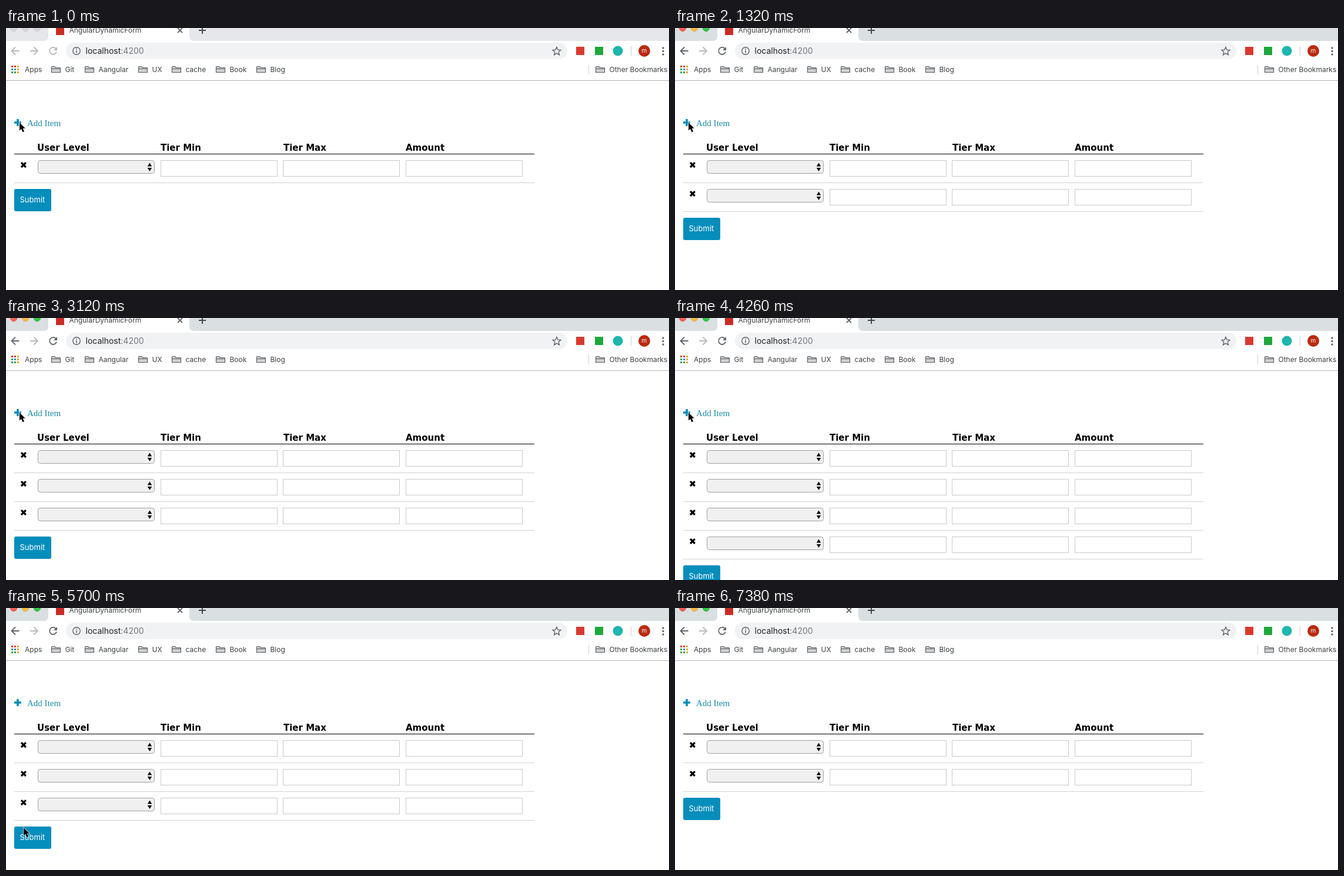
Write an HTML page that moves like this. It is 1128 by 446 pixels and loops after 7.44 s.

```html
<!DOCTYPE html>
<html lang="en">
<head>
<meta charset="utf-8">
<title>Dynamic form</title>
<style>
  html, body { margin: 0; width: 100%; height: 100%; overflow: hidden; background: #fff; }
  svg { display: block; }
  text { font: 12px Inter, sans-serif; fill: #3c4043; white-space: pre; }
  .url { font-size: 14px; fill: #202124; }
  .head { font: bold 15px "DejaVu Sans", sans-serif; fill: #000; }
  .link { font: 15px "Liberation Serif", serif; fill: #1b8aa8; }
  .submit { font-size: 13px; fill: #fff; }
  .line { fill: none; stroke: #5f6368; stroke-width: 1.8; }
  .idle #strip { fill: #e5e7eb; }
  .idle .light { fill: #d4d6d9; stroke: #c3c5c8; }
  .idle .nav { opacity: .45; }
</style>
</head>
<body>
<svg id="stage" width="1128" height="446" viewBox="0 0 1128 446">
  <rect id="strip" width="1128" height="22" fill="#dadfe1"/>
  <path d="M64 22Q72 22 72 14V-4H312V14Q312 22 320 22Z" fill="#fff"/>
  <circle class="light" cx="13" cy="0" r="5.5" fill="#fc615d" stroke="#df4744"/>
  <circle class="light" cx="33" cy="0" r="5.5" fill="#fdbc40" stroke="#de9f34"/>
  <circle class="light" cx="53" cy="0" r="5.5" fill="#34c84a" stroke="#27aa35"/>
  <rect x="85" y="-3" width="14" height="15" fill="#c92d25"/>
  <text x="107.5" y="8">AngularDynamicForm</text>
  <path class="line" d="M292 0l8 8m0-8l-8 8" stroke-width="1.6"/>
  <path class="line" d="M328 4h12M334 -2v12" style="stroke:#45494d;stroke-width:2"/>

  <path class="line nav" d="M22.500 39H10M16 32.500L9.500 39L16 45.500"/>
  <path class="line" d="M41 39H53.500M47.500 32.500L54 39L47.500 45.500" opacity=".45"/>
  <g class="nav">
    <path class="line" d="M84.700 35A6 6 0 1 0 86 40.500"/>
    <path d="M87 32v6h-6z" fill="#5f6368"/>
  </g>
  <rect x="102" y="25" width="853" height="28" rx="14" fill="#f0f2f4"/>
  <circle class="line" cx="120" cy="39" r="6.200" style="stroke-width:1.400"/>
  <path class="line" d="M120 35v1.700M120 38v4.500" style="stroke-width:1.500"/>
  <text class="url" x="135.500" y="44">localhost<tspan fill="#72767b">:4200</tspan></text>
  <path class="line" d="M937 32.500l2 4.600 4.900.4-3.700 3.300 1.100 4.900-4.300-2.600-4.300 2.600 1.100-4.900-3.700-3.300 4.900-.4z" style="stroke-width:1.400"/>
  <rect x="970" y="32" width="14" height="14" fill="#d93a30"/>
  <rect x="1002" y="32" width="14" height="14" fill="#1ea83c"/>
  <circle cx="1041" cy="39" r="8.500" fill="#20b5ad"/>
  <path d="M1063.500 31v16M991.500 63v16" stroke="#cfd1d4"/>
  <circle cx="1086" cy="39" r="10" fill="#b92b12"/>
  <text x="1086" y="42" text-anchor="middle" style="font-size:10px;fill:#fff">m</text>
  <path d="M1118 34h.01M1118 39.500h.01M1118 45h.01" stroke="#5f6368" stroke-width="3.400" stroke-linecap="round"/>
  <g id="bookmarks"></g>
  <path d="M0 89.500H1128" stroke="#b1b3b5"/>

  <path d="M14 161H26M20 155V167" stroke="#058cb5" stroke-width="3.600"/>
  <text class="link" x="36" y="167">Add Item</text>
  <g id="heads"></g>
  <path d="M14 214.500H899" stroke="#000"/>
  <g id="rows"></g>
  <g id="submit">
    <rect x="14" y="274" width="63" height="38" rx="3" fill="#058dbb"/>
    <text class="submit" x="23.500" y="297">Submit</text>
  </g>
  <path id="cursor" d="M0 0V13.500L3 10.700L5.400 16.200L8 15L5.600 9.700H9.700Z" fill="#000" stroke="#fff" stroke-width="1.200" paint-order="stroke"/>
</svg>
<script>
const LOOP = 7440, STEP = 60, ROW_HEIGHT = 49, MAX_ROWS = 4, FOCUS_AT = 240;
const $ = id => document.getElementById(id);

// [time, row count]
const rowCounts = [[0, 1], [1260, 2], [2760, 3], [4260, 4], [5340, 3], [6480, 2]];
// [time, x, y]
const cursorPath = [
  [0, 23, 161], [4320, 23, 161], [4800, 43, 361], [4900, 43, 361], [5160, 30, 374],
  [5760, 30, 374], [6240, 31, 333], [6600, 31, 333], [7140, 36, 465], [LOOP, 36, 465]
];

const folder = x => `<path d="M${x} 75.500V66.500Q${x} 65.500 ${x + 1} 65.500H${x + 5}L${x + 7} 67.500H${x + 14}Q${x + 15} 67.500 ${x + 15} 68.500V75.500Z
  M${x} 69.500H${x + 15}" fill="#d0d1d3" stroke="#55595d" stroke-width="1.100"/>`;

const dotColors = ["#e0392d", "#e0392d", "#e9a52b", "#2f9e50", "#3f7fe8", "#e9a52b", "#2f9e50", "#2f9e50", "#e9a52b"];
const appsGrid = dotColors.map((color, i) =>
  `<rect x="${9 + i % 3 * 5}" y="${64 + (i / 3 | 0) * 5}" width="3" height="3" fill="${color}"/>`).join("");

const bookmarks = [["Git", 78], ["Aangular", 135], ["UX", 226], ["cache", 283], ["Book", 358], ["Blog", 427], ["Other Bookmarks", 1004]];
$("bookmarks").innerHTML = appsGrid + `<text x="32" y="75">Apps</text>` +
  bookmarks.map(([name, x]) => folder(x - .5) + `<text x="${x + 22.5}" y="75">${name}</text>`).join("");

$("heads").innerHTML = [["User Level", 53], ["Tier Min", 263], ["Tier Max", 472], ["Amount", 680]]
  .map(([name, x]) => `<text class="head" x="${x}" y="209">${name}</text>`).join("");

const inputs = [263, 471, 680].map(x =>
  `<rect x="${x + .5}" y="225.500" width="198" height="27" fill="#fff" stroke="#c9c9c9"/>`).join("");
$("rows").innerHTML = Array.from({ length: MAX_ROWS }, (_, i) => `<g transform="translate(0 ${i * ROW_HEIGHT})">
  <path d="M26 229.200L33.800 237M33.800 229.200L26 237" stroke="#000" stroke-width="3.200"/>
  <rect x="54.500" y="225.500" width="198" height="22" rx="4" fill="#f0f0f1" stroke="#a0a0a0"/>
  <path d="M240.800 235.500L244.500 229.500L248.200 235.500ZM240.800 238L244.500 244L248.200 238Z"/>
  ${inputs}<path d="M14 263.500H899" stroke="#d2d2d2"/></g>`).join("");

function cursorAt(t) {
  const i = cursorPath.findIndex(key => key[0] > t);
  const [t0, x0, y0] = cursorPath[i - 1], [t1, x1, y1] = cursorPath[i];
  const p = (t - t0) / (t1 - t0), ease = p * p * (3 - 2 * p);
  return [x0 + (x1 - x0) * ease, y0 + (y1 - y0) * ease];
}

function draw(now) {
  const t = Math.floor(now % LOOP / STEP) * STEP;
  const count = rowCounts.filter(([start]) => start <= t).pop()[1];
  $("stage").classList.toggle("idle", t < FOCUS_AT);
  [...$("rows").children].forEach((row, i) => row.style.display = i < count ? "" : "none");
  $("submit").setAttribute("transform", `translate(0 ${(count - 1) * ROW_HEIGHT})`);
  $("cursor").setAttribute("transform", `translate(${cursorAt(t)})`);
  requestAnimationFrame(loop);
}

const start = performance.now();
const loop = () => draw(performance.now() - start);
draw(0);
</script>
</body>
</html>
```
